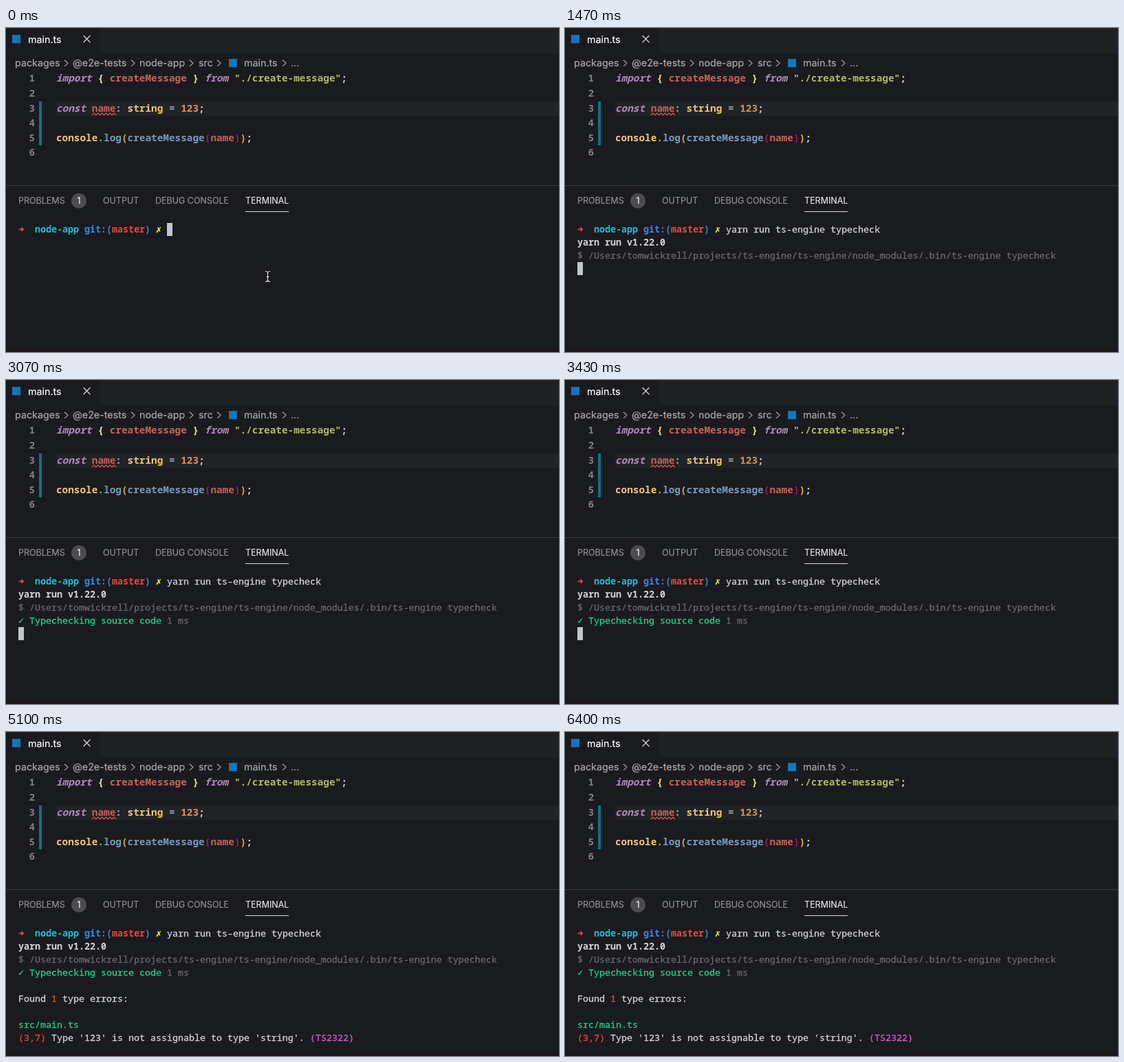
These frames come from a looping animation (804 px wide and 472 px high, 6.43 s). An HTML page:

```html
<!DOCTYPE html>
<html lang="en">
<head>
<meta charset="utf-8">
<title>Type checking in a terminal</title>
<style>
  html, body { margin: 0; width: 100%; height: 100%; overflow: hidden; background: #1a1b1e; }
  svg { display: block; width: 804px; height: 472px; }
  text { white-space: pre; }
  .ui { font-family: Inter, "Open Sans", sans-serif; font-size: 14.3px; stroke-width: .2px; }
  .panel { font-family: Inter, "Open Sans", sans-serif; font-size: 12.5px; stroke-width: .15px; }
  .code { font-family: "Noto Sans Mono", "DejaVu Sans Mono", monospace; font-size: 14.38px; font-weight: 600; }
  .term { font-family: "Noto Sans Mono", "DejaVu Sans Mono", monospace; font-size: 13.33px; font-weight: 500; stroke-width: .3px; }
  .bold { font-weight: 700; stroke-width: 0; }
  .symbol { font-family: "DejaVu Sans Mono", "DejaVu Sans", monospace; font-weight: 700; }
</style>
</head>
<body>
<svg id="stage" viewBox="0 0 804 472"></svg>
<script>
const LOOP = 6430;
const stage = document.getElementById('stage');

function add(parent, tag, attrs, content) {
  const node = document.createElementNS('http://www.w3.org/2000/svg', tag);
  for (const key in attrs) node.setAttribute(key, attrs[key]);
  if (content !== undefined) node.textContent = content;
  parent.appendChild(node);
  return node;
}

const rect = (x, y, width, height, fill, parent = stage) =>
  add(parent, 'rect', { x, y, width, height, fill });
const stroke = (d, color, width = 1, parent = stage) =>
  add(parent, 'path', { d, fill: 'none', stroke: color, 'stroke-width': width });
// The hairline stroke in the text colour gives a medium weight.
const label = (x, y, text, fill, cls, extra = {}, parent = stage) =>
  add(parent, 'text', { x, y, fill, stroke: cls === 'code' ? 'none' : fill, class: cls, ...extra }, text);

const ink = {
  purple: '#ab8cb7', red: '#c75f60', cream: '#e6dfa3', green: '#b0b965', white: '#d0d2d1',
  yellow: '#efc672', teal: '#83b5af', orange: '#db915e', blue: '#7698bb', gold: '#e0b02d',
  magenta: '#a3195f'
};
const tty = {
  white: '#d4d5d6', grey: '#68696b', cyan: '#29b5d8', blue: '#3587e4', red: '#e64747',
  yellow: '#f3ee43', green: '#23d18b', magenta: '#c65fc8'
};

// Editor
function drawTabs() {
  rect(0, 0, 804, 472, '#1a1b1e');
  rect(137, 0, 667, 37, '#202122');
  rect(9, 10, 12, 12, '#1674bc');
  label(32, 22, 'main.ts', '#f8f8f8', 'ui');
  stroke('M112.5 11l10 10m0-10l-10 10', '#d8d8d8', 1.2);

  const crumbs = [[13, 'packages'], [97, '@e2e-tests'], [194, 'node-app'], [280, 'src'],
                  [346, 'main.ts'], [414, '...']];
  crumbs.forEach(([x, text]) => label(x, 56, text, '#a8a9ab', 'ui'));
  [85, 182, 267, 307, 402].forEach(x => stroke(`M${x} 46.5l5 4.7-5 4.7`, '#a0a1a3', 1.2));
  rect(324, 45, 12, 12, '#1674bc');
}

function codeLine(number, tokens) {
  const y = 78.3 + (number - 1) * 21.6;
  label(42, y, number, '#7d7f82', 'code', { 'text-anchor': 'end' });
  tokens.forEach(([column, text, color, italic]) =>
    label(73 + column * 8.63, y, text, ink[color], 'code', italic ? { 'font-style': 'italic' } : {}));
}

function drawEditor() {
  rect(73, 107, 731, 21, '#222326');
  rect(48, 107, 4, 64, '#0b718a');
  codeLine(1, [[0, 'import', 'purple', true], [7, '{', 'cream'], [9, 'createMessage', 'red'],
    [23, '}', 'cream'], [25, 'from', 'purple', true], [30, '"./create-message"', 'green'], [48, ';', 'white']]);
  codeLine(2, []);
  codeLine(3, [[0, 'const', 'purple', true], [6, 'name', 'red'], [10, ':', 'teal'],
    [12, 'string', 'yellow'], [19, '=', 'teal'], [21, '123', 'orange'], [24, ';', 'white']]);
  codeLine(4, []);
  codeLine(5, [[0, 'console', 'yellow'], [7, '.', 'teal'], [8, 'log', 'blue'], [11, '(', 'gold'],
    [12, 'createMessage', 'blue'], [25, '(', 'magenta'], [26, 'name', 'red'], [30, ')', 'magenta'],
    [31, ')', 'gold'], [32, ';', 'white']]);
  codeLine(6, []);
  stroke('M125 127' + 'l2.9-3 2.9 3'.repeat(6), '#e9564f', 1.1);
}

function drawPanel() {
  rect(0, 229, 804, 1, '#3b3c3f');
  [[18, 'PROBLEMS'], [141, 'OUTPUT'], [217, 'DEBUG CONSOLE'], [348, 'TERMINAL']].forEach(([x, text]) =>
    label(x, 256, text, x === 348 ? '#e8e8e8' : '#929395', 'panel'));
  add(stage, 'circle', { cx: 106, cy: 251.7, r: 11, fill: '#4b4c4e' });
  label(106, 256, '1', '#f4f4f4', 'panel', { 'text-anchor': 'middle' });
  rect(348, 267, 63, 1, '#dedede');
  rect(0, 468, 804, 4, '#1a161a');
}

// Terminal
const rowTop = row => 284 + row * 19;
const columnX = column => 18 + column * 8;

function termLine(row, tokens) {
  const group = add(stage, 'g', {});
  tokens.forEach(([column, text, color, style = '']) =>
    label(columnX(column), rowTop(row) + 13.8, text, tty[color], `term ${style}`, {}, group));
  return group;
}

drawTabs();
drawEditor();
drawPanel();

stroke('M18.8 293.3h6M22.5 290.6l2.7 2.7-2.7 2.7', tty.red, 1.7);
termLine(0, [[3, 'node-app', 'cyan', 'bold'], [12, 'git:(', 'blue', 'bold'], [17, 'master', 'red', 'bold'],
  [23, ')', 'blue', 'bold'], [25, '✗', 'yellow', 'symbol']]);

const COMMAND_AT = 350, ENTER_AT = 1130, RUN_AT = 1370, CHECKED_AT = 3050, ERRORS_AT = 3700;

const output = [
  [COMMAND_AT, termLine(0, [[27, 'yarn run ts-engine typecheck', 'white']])],
  [RUN_AT, termLine(1, [[0, 'yarn run v1.22.0', 'white', 'bold']])],
  [RUN_AT, termLine(2, [[0, '$ /Users/tomwickrell/projects/ts-engine/ts-engine/node_modules/.bin/ts-engine typecheck', 'grey']])],
  [CHECKED_AT, termLine(3, [[0, '✓', 'green', 'symbol'], [2, 'Typechecking source code', 'green'], [27, '1 ms', 'grey']])],
  [ERRORS_AT, termLine(5, [[0, 'Found', 'white'], [6, '1', 'red'], [8, 'type errors:', 'white']])],
  [ERRORS_AT, termLine(7, [[0, 'src/main.ts', 'green']])],
  [ERRORS_AT, termLine(8, [[0, '(3,7)', 'red'], [6, "Type '123' is not assignable to type 'string'.", 'white'],
    [53, '(TS2322)', 'magenta']])]
];

// Cursor stops: time, column, row
const stops = [[0, 27, 0], [COMMAND_AT, 55, 0], [ENTER_AT, 0, 1], [RUN_AT, 0, 3], [CHECKED_AT, 0, 4]];
const cursor = rect(0, 0, 8, 19, '#c5c6c8');

const pointer = add(stage, 'g', {});
const beam = 'M377 354.5q3.5 0 3.5 2v11q0 2-3.5 2M384 354.5q-3.5 0-3.5 2M384 369.5q-3.5 0-3.5-2M378.5 362.5h4';
stroke(beam, '#08080a', 2.6, pointer);
stroke(beam, '#f2f2f2', 1.2, pointer);

const show = (node, on) => node.setAttribute('visibility', on ? 'visible' : 'hidden');

function render(t) {
  output.forEach(([at, group]) => show(group, t >= at));
  const [, column, row] = stops.filter(([at]) => t >= at).pop();
  cursor.setAttribute('x', columnX(column));
  cursor.setAttribute('y', rowTop(row));
  show(cursor, t < ERRORS_AT);
  show(pointer, t < COMMAND_AT);
}

const start = performance.now();
function tick() {
  render((performance.now() - start) % LOOP);
  requestAnimationFrame(tick);
}
tick();
</script>
</body>
</html>
```
